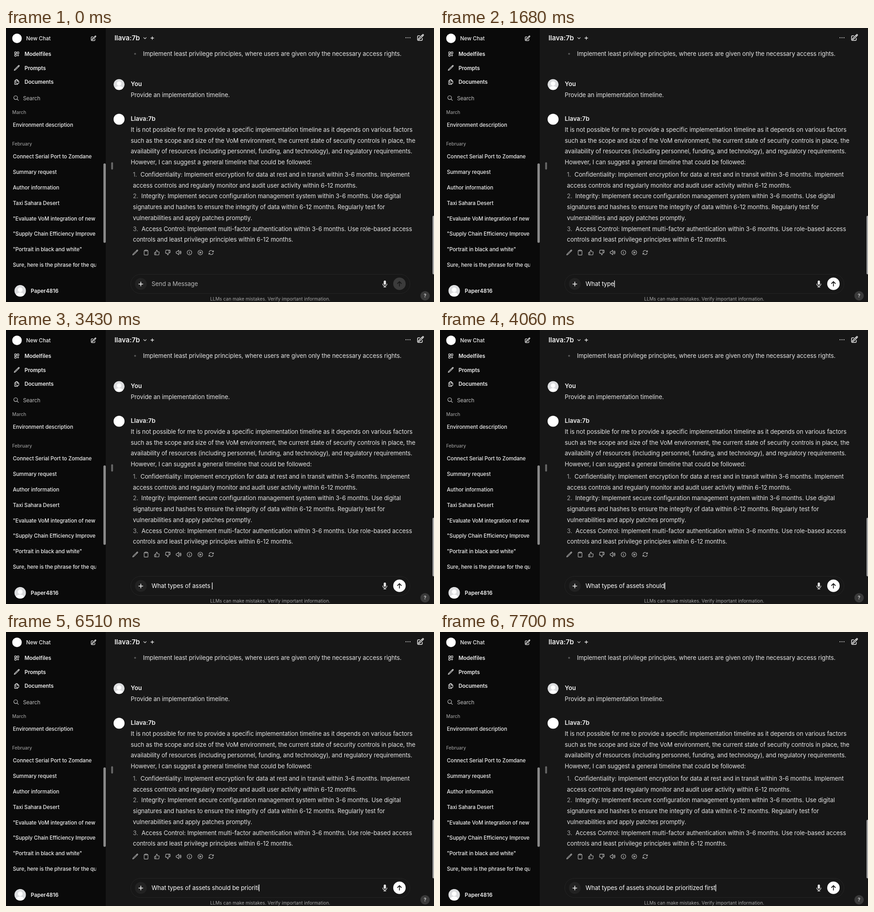
Recreate the animation shown at these times as an HTML page. Size 935 by 599 pixels, loop 8000 ms.

```html
<!DOCTYPE html>
<html lang="en">
<head>
<meta charset="utf-8">
<title>Chat</title>
<style>
  html, body { margin: 0; width: 100%; height: 100%; overflow: hidden; background: #171717; }
  svg { display: block; }
  text { font-family: Inter, "Open Sans", sans-serif; white-space: pre; fill: #f0f0f0; }
  .prose, .marker, .input { font-size: 13.05px; letter-spacing: -.083px; }
  .prose { fill: #e6e6e6; }
  .marker { fill: #a3a3a3; }
  .input { fill: #fff; }
  .name { font-size: 13.3px; font-weight: 600; }
  .model { font-size: 14.8px; font-weight: 600; }
  .nav { font-size: 11.5px; font-weight: 500; }
  .link { font-size: 11.5px; font-weight: 600; }
  .chat { font-size: 11.4px; font-weight: 500; letter-spacing: -.045px; }
  .user { font-size: 11.7px; font-weight: 600; }
  .search { font-size: 11.5px; letter-spacing: -.1px; fill: #c0c0c0; }
  .month { font-size: 10.1px; font-weight: 500; fill: #959595; }
  .note { font-size: 10px; letter-spacing: .05px; fill: #a8a8a8; }
  .hint { fill: #b8b8b8; }
  .icon { fill: none; stroke-linecap: round; stroke-linejoin: round; }
</style>
</head>
<body>
<svg id="stage" width="935" height="599" viewBox="0 0 935 599">
  <defs>
    <clipPath id="listClip"><rect x="0" y="0" width="196.5" height="599"/></clipPath>
    <clipPath id="round"><circle r="12"/></clipPath>
    <g id="avatar" clip-path="url(#round)">
      <circle r="12" fill="#dcdddf"/>
      <circle cy="-2" r="4.8" fill="#fff"/>
      <ellipse cy="10.5" rx="8.8" ry="7" fill="#fff"/>
    </g>
  </defs>
  <rect width="935" height="599" fill="#171717"/>
  <rect width="218" height="599" fill="#0a0a0a"/>
  <rect x="212.8" y="296" width="5.2" height="173.5" rx="2.6" fill="#8a8a8a"/>
  <rect x="229.8" y="293.5" width="4" height="16" rx="1.8" fill="#676767"/>
  <rect x="931.8" y="410.5" width="5" height="128" rx="2.2" fill="#a8a8a8"/>

  <circle cx="24" cy="22.7" r="10.4" fill="#fff"/>
  <circle cx="247" cy="199.5" r="12" fill="#fff"/>
  <use href="#avatar" x="247" y="123.5"/>
  <use href="#avatar" transform="translate(31 574.5) scale(1.06)"/>
  <circle cx="282" cy="56.5" r="2.1" fill="#565656"/>

  <rect x="272.5" y="538.5" width="610" height="42" rx="21" fill="#171717" stroke="#252525"/>
  <circle cx="294.5" cy="559.5" r="13" fill="#222"/>
  <circle id="send" cx="859.5" cy="559.2" r="13.6"/>
  <circle cx="915.5" cy="585.5" r="10.2" fill="#3a3a3a"/>
  <text x="915.5" y="589.2" text-anchor="middle" font-size="10.2" font-weight="500">?</text>

  <g id="texts"></g>
  <g id="icons"></g>

  <text id="typed" class="input" x="318" y="564.3"></text>
  <rect id="caret" y="552" width="1.4" height="15" fill="#f2f2f2"/>
</svg>
<script>
const NS = 'http://www.w3.org/2000/svg';
const byId = id => document.getElementById(id);

function add(parent, tag, attrs, content = '') {
  const el = document.createElementNS(NS, tag);
  for (const key in attrs) el.setAttribute(key, attrs[key]);
  el.textContent = content;
  return parent.appendChild(el);
}

const label = (cls, x, y, content) => add(byId('texts'), 'text', { class: cls, x, y }, content);

label('nav', 44, 27, 'New Chat');
['Modelfiles', 'Prompts', 'Documents'].forEach((s, i) => label('link', 40.5, 61 + i * 30.5, s));
label('search', 37.3, 157.8, 'Search');
label('month', 13.5, 187.8, 'March');
label('chat', 15, 215.7, 'Environment description');
label('month', 13.5, 257.2, 'February');
[
  'Connect Serial Port to Zomdane',
  'Summary request',
  'Author information',
  'Taxi Sahara Desert',
  '"Evaluate VoM integration of new',
  '"Supply Chain Efficiency Improve',
  '"Portrait in black and white"',
  'Sure, here is the phrase for the qu'
].forEach((s, i) => label('chat', 15, 285.2 + i * 33.85, s).setAttribute('clip-path', 'url(#listClip)'));
label('user', 54, 578.8, 'Paper4816');

label('model', 237, 27.2, 'llava:7b');
label('prose', 299.3, 61, 'Implement least privilege principles, where users are given only the necessary access rights.');
label('name', 272.5, 126.8, 'You');
label('prose', 272.5, 150.6, 'Provide an implementation timeline.');
label('name', 272.5, 203, 'Llava:7b');
[
  'It is not possible for me to provide a specific implementation timeline as it depends on various factors',
  'such as the scope and size of the VoM environment, the current state of security controls in place, the',
  'availability of resources (including personnel, funding, and technology), and regulatory requirements.',
  'However, I can suggest a general timeline that could be followed:'
].forEach((s, i) => label('prose', 272.5, 226.8 + i * 23.7, s));
[
  [293.7, 'Confidentiality: Implement encryption for data at rest and in transit within 3-6 months. Implement', '1.'],
  [277.3, 'access controls and regularly monitor and audit user activity within 6-12 months.'],
  [295.5, 'Integrity: Implement secure configuration management system within 3-6 months. Use digital', '2.'],
  [277.3, 'signatures and hashes to ensure the integrity of data within 6-12 months. Regularly test for'],
  [277.3, 'vulnerabilities and apply patches promptly.'],
  [296, 'Access Control: Implement multi-factor authentication within 3-6 months. Use role-based access', '3.'],
  [277.3, 'controls and least privilege principles within 6-12 months.']
].forEach(([x, s, marker], i) => {
  const y = 325 + i * 23.7;
  if (marker) label('marker', 277.3, y, marker);
  label('prose', x, y, s);
});
label('note', 446, 595.7, 'LLMs can make mistakes. Verify important information.');

// Icon outlines on a 24-unit grid
const disc = 'M21 12a9 9 0 1 1-18 0a9 9 0 1 1 18 0z';
const shapes = {
  pencil: 'M16.9 4.5l1.7-1.7a1.9 1.9 0 1 1 2.6 2.6L6.8 19.8a4.5 4.5 0 0 1-1.9 1.1l-2.7.8.8-2.7a4.5 4.5 0 0 1 1.1-1.9zM16.9 4.5l2.6 2.6',
  compose: 'M16.9 4.5l1.7-1.7a1.9 1.9 0 1 1 2.6 2.6L10.6 16a4.5 4.5 0 0 1-1.9 1.2L6 18l.8-2.7a4.5 4.5 0 0 1 1.1-1.9zM16.9 4.5l2.6 2.6M18 14v4.7A2.3 2.3 0 0 1 15.7 21H5.3A2.3 2.3 0 0 1 3 18.7V8.3A2.3 2.3 0 0 1 5.3 6H10',
  models: 'M5 3.8h4.2q1.3 0 1.3 1.3v4q0 1.4-1.3 1.4H5q-1.2 0-1.2-1.4v-4q0-1.3 1.2-1.3zM15 3.8h4q1.3 0 1.3 1.3v4q0 1.4-1.3 1.4h-4q-1.4 0-1.4-1.4v-4q0-1.3 1.4-1.3zM5 13.5h4.2q1.3 0 1.3 1.4v4q0 1.3-1.3 1.3H5q-1.2 0-1.2-1.3v-4q0-1.4 1.2-1.4zM13.5 16.9h6.8M16.9 13.5v6.8',
  documents: 'M15.8 17.3v3.3q0 1.1-1.1 1.1H4.9q-1.1 0-1.1-1.1V7.9q0-1.1 1.1-1.1h3M13.5 2.3H9.4q-1.1 0-1.1 1.1v12.8q0 1.1 1.1 1.1h9.7q1.1 0 1.1-1.1V9zV9h6.7',
  search: 'M17.5 10.5a7 7 0 1 1-14 0a7 7 0 1 1 14 0zM15.6 15.6L21 21',
  clipboard: 'M8 4H6.5a2 2 0 0 0-2 2v14a2 2 0 0 0 2 2h11a2 2 0 0 0 2-2V6a2 2 0 0 0-2-2H16M9 2h6q1 0 1 1v2q0 1-1 1H9q-1 0-1-1V3q0-1 1-1z',
  thumb: 'M14 9V5a3 3 0 0 0-3-3l-4 9v11h11.3a2 2 0 0 0 2-1.7l1.4-9a2 2 0 0 0-2-2.3zM7 22H4a2 2 0 0 1-2-2v-7a2 2 0 0 1 2-2h3',
  speaker: 'M19.1 5.6a9 9 0 0 1 0 12.8M16.5 8.3a5.3 5.3 0 0 1 0 7.4M6.8 8.3l4.7-4.8q1.3-.8 1.3.6v15.8q0 1.4-1.3.6l-4.7-4.8H4.5q-1.6 0-2-1.6a9 9 0 0 1 0-4.6q.5-1.2 2-1.2z',
  info: disc + 'M11.2 11.3h.9v4.9M12 7.7v.2',
  play: disc + 'M10 8.6l5.7 3.4-5.7 3.4z',
  refresh: 'M16 9.3h5v-5M3 19.6v-5h5M3 14.7l3.2 3.2a8.3 8.3 0 0 0 13.8-3.7M4 9.9a8.3 8.3 0 0 1 13.8-3.7L21 9.3',
  chevron: 'M5 8.5l7 7 7-7',
  plus: 'M12 4v16M4 12h16',
  dots: 'M4 12h.01M12 12h.01M20 12h.01',
  mic: 'M5 11.5a7 7 0 0 0 14 0M12 18.5V22M8.5 22h7',
  arrow: 'M12 20.5v-17M4.8 10.7L12 3.5l7.2 7.2'
};

function icon(name, x, y, size, line, color = '#ececec', turn = 0) {
  const scale = size / 24;
  return add(byId('icons'), 'path', {
    class: 'icon', d: shapes[name], stroke: color, 'stroke-width': line / scale,
    transform: `translate(${x} ${y}) rotate(${turn}) scale(${scale}) translate(-12 -12)`
  });
}

icon('compose', 191, 22.7, 13, 1.2);
icon('models', 23.5, 57, 13.4, 1.15);
icon('pencil', 23.5, 87.3, 13.4, 1.15);
icon('documents', 23.5, 118, 13.4, 1.15);
icon('search', 22, 153.2, 14, 1.2, '#c4c4c4');
icon('chevron', 303.6, 22.2, 9.5, 1.2);
icon('plus', 319.6, 22, 9.5, 1.3);
icon('dots', 878.2, 21.3, 13, 2.1);
icon('compose', 905.3, 21, 16.5, 1.5);
['pencil', 'clipboard', 'thumb', 'thumb', 'speaker', 'info', 'play', 'refresh'].forEach((name, i) =>
  icon(name, 282.3 + i * 23.7, 490.8, name === 'thumb' ? 12.5 : 13.4, 1.15, '#b8b8b8', i === 3 ? 180 : 0));
icon('plus', 294.5, 559.7, 13, 1.6, '#f5f5f5');
icon('mic', 827.6, 559.7, 16, 1.3, '#e3e3e3');
add(byId('icons'), 'rect', { x: 825.1, y: 552, width: 5, height: 9.6, rx: 2.5, fill: '#e3e3e3' });
const arrow = icon('arrow', 859.5, 559.3, 14, 1.7);

// Typing: one time in ms for each character
const message = 'What types of assets should be prioritized first';
const keyTimes = [
  840, 980, 1050, 1190, 1260, 1330, 1470, 1540, 1680, 1820,
  1960, 2100, 2240, 2310, 2450, 2590, 2730, 2870,
  3080, 3290, 3430, 3570, 3640, 3780, 3850, 3990, 4060, 4270,
  4690, 4830, 4970, 5110, 5250, 5320, 5600, 5880, 6090, 6230,
  6510, 6650, 6790, 6930, 7070, 7210, 7350, 7490, 7630, 7700
];
const LOOP = 8000, CARET_ON = 350, SEND_READY = 910;
const typed = byId('typed'), caret = byId('caret'), send = byId('send');

typed.textContent = message;
const caretStops = [318, ...keyTimes.map((_, i) => typed.getEndPositionOfChar(i).x)];

function render(time) {
  const count = keyTimes.filter(t => t <= time).length;
  typed.textContent = count ? message.slice(0, count) : 'Send a Message';
  typed.classList.toggle('hint', !count);
  caret.setAttribute('x', caretStops[count]);
  caret.setAttribute('visibility', time >= CARET_ON ? 'visible' : 'hidden');
  send.setAttribute('fill', !count ? '#3b3b3b' : time < SEND_READY ? '#a3a3a3' : '#fff');
  arrow.setAttribute('stroke', count ? '#141414' : '#171717');
}

const start = performance.now();
function tick() {
  render((performance.now() - start) % LOOP);
  requestAnimationFrame(tick);
}
tick();
</script>
</body>
</html>
```
